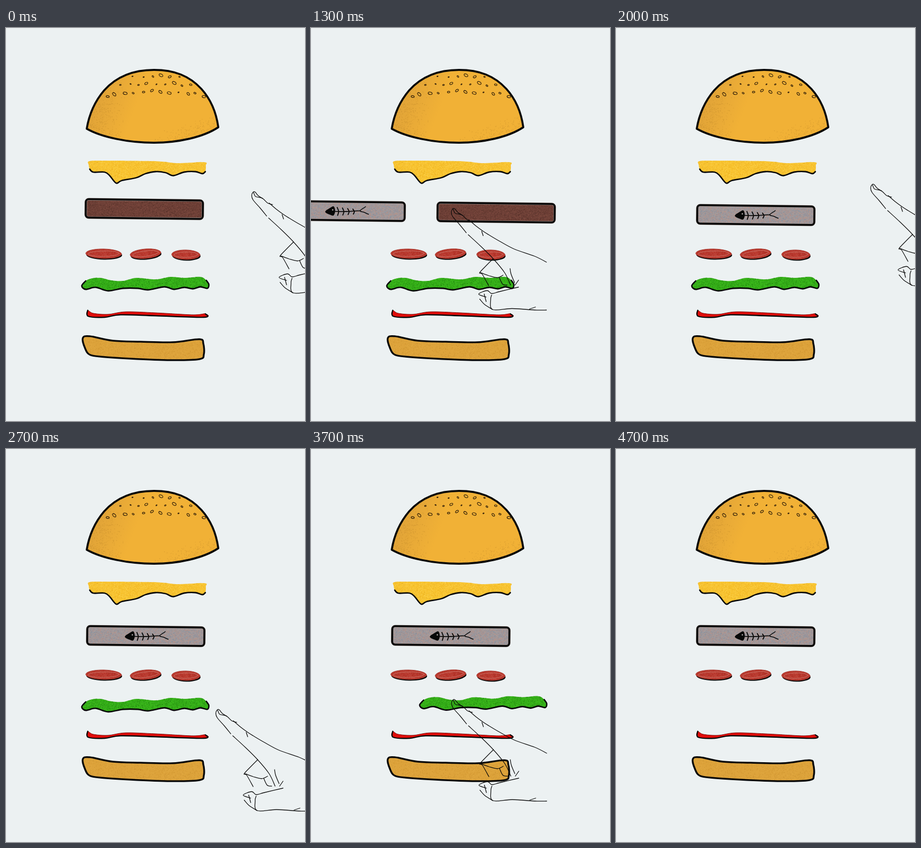
Animation of 600 by 788 pixels, one loop 5000 ms. Source, as an HTML page with a canvas:

```html
<!DOCTYPE html>
<html lang="en">
<head>
<meta charset="utf-8">
<title>Burger swap</title>
<style>
html, body { margin: 0; width: 100%; height: 100%; overflow: hidden; background: #ecf1f2; }
canvas { display: block; }
</style>
</head>
<body>
<canvas id="stage" width="600" height="788"></canvas>
<script>
const ctx = document.getElementById('stage').getContext('2d');
const LOOP = 5000, TAU = Math.PI * 2;

// Three held poses per second, each starting on a tenth of a second
const poseStart = k => Math.round(k * 10 / 3) * 100;
function poseAt(t) {
  let k = 0;
  while (poseStart(k + 1) <= t) k++;
  return k;
}

// Turning points of the fingertip: [pose, x, y]
const route = [[0, 497, 329], [2, 333, 353], [3, 215, 361], [5, 356, 364], [6, 515, 314], [7, 500, 376],
  [8, 425, 523], [10, 213, 509], [11, 286, 503], [12, 437, 497], [14, 697, 463]];
function fingertip(k) {
  const i = route.findIndex(p => p[0] >= k);
  if (i < 1) return route[0].slice(1);
  const a = route[i - 1], b = route[i], u = (k - a[0]) / (b[0] - a[0]);
  return [a[1] + (b[1] - a[1]) * u, a[2] + (b[2] - a[2]) * u];
}

// Smooth curve through "x,y x,y ..." points
function curve(text, closed) {
  const pts = text.split(' ').map(p => p.split(',').map(Number));
  const n = pts.length, path = new Path2D();
  const at = i => closed ? pts[(i + n) % n] : pts[Math.max(0, Math.min(n - 1, i))];
  path.moveTo(...pts[0]);
  for (let i = 0; i < n - (closed ? 0 : 1); i++) {
    const [a, b, c, d] = [at(i - 1), at(i), at(i + 1), at(i + 2)];
    path.bezierCurveTo(b[0] + (c[0] - a[0]) / 6, b[1] + (c[1] - a[1]) / 6,
      c[0] - (d[0] - b[0]) / 6, c[1] - (d[1] - b[1]) / 6, ...c);
  }
  if (closed) path.closePath();
  return path;
}

function oval(x, y, rx, ry, tilt) {
  const path = new Path2D();
  path.ellipse(x, y, rx, ry, tilt, 0, TAU);
  return path;
}

let seed = 1;
function rnd() {
  seed = (seed * 16807) % 2147483647;
  return seed / 2147483647;
}

function ink(path, width, color = '#080808') {
  ctx.strokeStyle = color;
  ctx.lineWidth = width;
  ctx.stroke(path);
}

function paintShape(path, color) {
  ctx.fillStyle = color;
  ctx.fill(path);
}

// Fill a shape and sprinkle coloured grain inside it
function grainy(path, fill, [x, y, w, h], colors, density = () => 0.45) {
  seed = 4321;
  ctx.save();
  ctx.clip(path);
  paintShape(path, fill);
  ctx.globalAlpha = 0.5;
  for (let i = 0; i < w * h; i++) {
    const gx = x + rnd() * w, gy = y + rnd() * h;
    if (rnd() > density(gx, gy)) continue;
    ctx.fillStyle = colors[i % colors.length];
    ctx.fillRect(gx, gy, 1.3, 1.3);
  }
  ctx.restore();
}

const bun = new Path2D('M162 202C167 172 179 146 197 125C222 97 257 84 297 84C338 84 368 96 392 122C411 143 422 170 426 199C396 219 345 230 297 230C245 230 192 219 162 202Z');

function drawBun() {
  const tone = ctx.createLinearGradient(172, 140, 255, 172);
  tone.addColorStop(0, '#dfa238');
  tone.addColorStop(1, '#f1b136');
  grainy(bun, tone, [160, 84, 268, 146], ['#c08a2c', '#d59a30'], (x, y) =>
    0.25 * Math.max(0.5 - (x - 165) / 150, (x - 330) / 220 + (y - 200) / 80));
  ink(bun, 4);
  // Sesame in three rows that widen downwards
  seed = 77;
  for (let row = 0; row < 3; row++) {
    const n = 6 + 3 * row;
    for (let i = 0; i < n; i++) {
      const off = (i - (n - 1) / 2) * 18, size = 1.2 + rnd() * 3;
      const x = 301 + off + rnd() * 6 - 3, y = 97 + 15 * row + off * off / 1100 + rnd() * 6 - 3;
      ink(oval(x, y, size, size * 0.6, rnd() * 1.4 - 0.6), 1.2, '#2a1a08');
    }
  }
}

const cheeseEdge = '168,283 175,289 198,289 208,296 221,311 232,306 262,300 280,292 300,288 320,290 336,296 357,289 380,288 394,292 400,288';
const cheese = curve(cheeseEdge + ' 401,276 398,269 345,271 300,267 200,266 167,267 166,275', true);

function drawCheese() {
  grainy(cheese, '#f8c22d', [164, 264, 240, 50], ['#ffd95c', '#e9ad20', '#fbcf45']);
  ink(curve(cheeseEdge), 2.8);
}

// Rounded slab about its own centre, tilted a little
function drawSlab(x, y, fill, grain, detail) {
  const box = [-117.5, -18.5, 235, 37], slab = new Path2D();
  slab.roundRect(...box, 6);
  ctx.save();
  ctx.translate(x, y);
  ctx.rotate(0.012);
  grainy(slab, fill, box, grain);
  ink(slab, 5, '#9a8f8a');
  ink(slab, 3.8);
  if (detail) detail();
  ctx.restore();
}

function drawFish() {
  const head = curve('-42,2 -32,-6 -25,-9 -22,0 -25,9 -32,8', true);
  paintShape(head, '#080808');
  paintShape(oval(-27, -2, 1.4, 1.4, 0), '#b5afad');
  ink(curve('-24,1 0,1 28,-1'), 1.8);
  for (let i = 0; i < 4; i++) {
    const x = -17 + 10.5 * i, h = 8 - i;
    ink(curve(`${x - 1},${1 - h} ${x + 2},1 ${x},${1 + h}`), 2);
  }
  ink(curve('39,-9 28,-1 36,2 45,6'), 1.6);
}

function drawBeef(x, y) {
  drawSlab(x, y, '#704138', ['#8a5247', '#512d27', '#633c31']);
}

function drawFishSlab(x, y) {
  drawSlab(x, y, '#a0979a', ['#c68b78', '#788ea2', '#aba5a2'], drawFish);
}

function drawTomatoes() {
  for (const [x, rx, tilt] of [[196, 36, 0.02], [280, 31, -0.08], [361, 28.5, 0.02]]) {
    const y = 452.5 + (x > 300 ? 2 : 0), disc = oval(x, y, rx, 9.5, tilt);
    paintShape(oval(x + 1, y + 2.5, rx, 9.5, tilt), '#080808');
    grainy(disc, '#ba3d32', [x - rx, y - 12, rx * 2, 24], ['#a02c25', '#cc5044', '#b5281f']);
    ink(disc, 1, '#a8352c');
    ink(oval(x, y, rx - 5, 5.5, tilt - 0.04), 0.8, '#d58276');
  }
}

const leafEdge = '160,507 152,517 160,524 180,520 205,527 235,522 265,522 285,525 318,519 337,524 358,520 375,523 390,519 404,522 407,514 402,506';
const leaf = curve(leafEdge + ' 390,499 360,501 330,499 300,504 262,501 235,507 212,506 190,501 172,502', true);

function drawLeaf(x, y) {
  ctx.save();
  ctx.translate(x, y);
  grainy(leaf, '#38b41a', [151, 496, 258, 34], ['#208010', '#42c422', '#2a9414']);
  ink(curve(leafEdge), 2.8);
  ctx.restore();
}

const sauceEdge = '164,566 165,578 198,580 230,575 300,577 397,580 400,573';
const sauce = curve(sauceEdge + ' 375,575 300,571 240,569 205,574 175,572', true);

function drawSauce() {
  paintShape(sauce, '#e00d0a');
  ink(sauce, 1, '#7c0806');
  ink(curve(sauceEdge), 2.4);
}

const base = curve('388,624 396,633 397,654 388,664 330,666 250,663 190,659 168,655 159,643 154,622 168,618 215,627 270,629 335,630', true);

function drawBase() {
  grainy(base, '#dda33b', [153, 617, 246, 50], ['#c58c2d', '#e8b14b', '#d1962f'], () => 0.15);
  ink(base, 3.6);
}

// Pen strokes measured from the fingertip
const strokes = [
  '18,13 9,7 3,0 -1,0 -4,7 -1,16 13,32 26,48',
  '0,1 4,9 17,12 28,22 38,25',
  '30,52 55,75 80,100 103,128 115,153',
  '31,22 45,34 60,45 71,52 93,65 123,81 163,95 187,107',
  '57,45 60,54',
  '80,100 68,112 53,128 58,131 71,154',
  '55,128 71,134 88,138 100,133',
  '92,137 99,151 108,153',
  '114,120 116,131 123,148',
  '131,143 124,153',
  '131,157 93,166 77,170 68,164 51,171 66,177',
  '53,181 63,192 79,202',
  '62,171 66,186',
  '77,173 75,182 79,202 118,200 163,203 187,203',
  '165,197 153,201'].map(s => curve(s));

function drawHand(x, y) {
  ctx.save();
  ctx.translate(x, y);
  strokes.forEach(s => ink(s, 1.3));
  ctx.restore();
}

function paint(k) {
  const push = Math.max(0, k - 3), pull = Math.max(0, k - 10);
  const enter = Math.min(1, (k - 4) / 2);
  ctx.fillStyle = '#ecf1f2';
  ctx.fillRect(0, 0, 600, 788);
  drawBun();
  drawCheese();
  if (push < 3) drawBeef(277.5 + 94 * push ** 0.83, 363 + 7 * Math.min(1, push));
  if (enter >= 0) drawFishSlab(70.5 + 210 * enter ** 1.8, 367 + 8 * enter);
  drawTomatoes();
  drawLeaf(66 * pull ** 1.54, -3.5 * pull);
  drawSauce();
  drawBase();
  drawHand(...fingertip(k));
}

ctx.lineCap = ctx.lineJoin = 'round';
let shown = -1;
const start = performance.now();
function tick() {
  const k = poseAt((performance.now() - start) % LOOP);
  if (k !== shown) paint(shown = k);
  requestAnimationFrame(tick);
}
tick();
</script>
</body>
</html>
```
